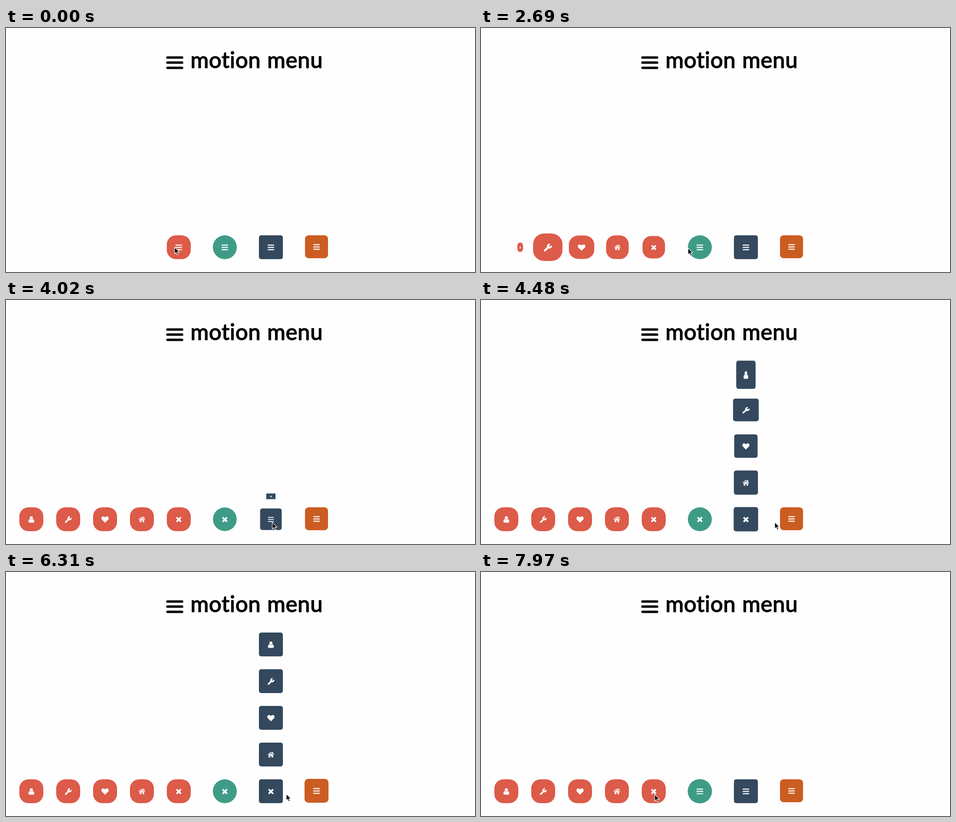
Animation, 1018 px wide and 532 px high, one loop 8 s. Source, as an HTML page:

```html
<!DOCTYPE html>
<html lang="en">
<head>
<meta charset="utf-8">
<title>motion menu</title>
<style>
  html, body { margin: 0; width: 100%; height: 100%; overflow: hidden; background: #fefefe; }
  svg { display: block; width: 1018px; height: 532px; }
  .title { font: 400 48px Lato, "Open Sans", sans-serif; letter-spacing: .6px; stroke: #000; stroke-width: 1.5px; stroke-linejoin: round; }
</style>
</head>
<body>
<svg id="stage" viewBox="0 0 1018 532" xmlns="http://www.w3.org/2000/svg">
  <defs>
    <path id="bars" d="M-6.2-5H6.2M-6.2 0H6.2M-6.2 5H6.2" stroke="#fff" stroke-width="2.1" stroke-linecap="round"/>
    <path id="close" d="M-3.5-3.2L3.5 3.8M3.5-3.2L-3.5 3.8" stroke="#fff" stroke-width="3.7" stroke-linecap="square"/>
    <g id="home" fill="#fff">
      <path d="M-5 1.2L0-3L5 1.2V5.3Q5 6 4.3 6H1.3V2.2H-1.3V6H-4.3Q-5 6-5 5.3Z"/>
      <path d="M3-6H5V-1L3-3Z"/>
      <path d="M-6.8 .3L0-5.3L6.8 .3" fill="none" stroke="#fff" stroke-width="1.5"/>
    </g>
    <path id="heart" fill="#fff" d="M0 7.2L-6.2 1.2C-8-.6-8.4-3-7.2-4.9C-5.6-7.3-2.2-7.2 0-4.2C2.2-7.2 5.6-7.3 7.2-4.9C8.4-3 8-.6 6.2 1.2Z"/>
    <g id="wrench">
      <path d="M-5.3 5.8L2-1.5" stroke="#fff" stroke-width="3.6" stroke-linecap="round"/>
      <path d="M6.6-3.9A3.2 3.2 0 1 1 4.3-6.2" transform="translate(-.5 .6)" fill="none" stroke="#fff" stroke-width="2.7"/>
    </g>
    <g id="user" fill="#fff">
      <ellipse cy="-3.3" rx="3.4" ry="3.7"/>
      <path d="M-3.4-.6Q0 2.4 3.4-.6Q6.3 .2 6.3 4.4Q6.3 7 3.8 7H-3.8Q-6.3 7-6.3 4.4Q-6.3 .2-3.4-.6Z"/>
    </g>
  </defs>
  <path d="M350.5 64.4H382.2M350.5 75.4H382.2M350.5 86.8H382.2" stroke="#000" stroke-width="5.3" stroke-linecap="round"/>
  <text class="title" x="400.5" y="87">motion</text>
  <text class="title" x="567" y="87">menu</text>
</svg>
<script>
const LOOP = 8000, GAP = 80, STAGGER = 100;
const stage = document.getElementById('stage');
const ICONS = ['home', 'heart', 'wrench', 'user'];

// quarter: ms until each scale first reaches 1, along and across the direction
const jelly = { quarter: [82, 45], slide: 38, swing: -1 };
const sling = { quarter: [80, 80], slide: 66, swing: 1 };

const MENUS = [
  { x: 375, y: 478, dir: [-1, 0], size: 52, radius: 20, color: '#dc5b49', open: 2370, shut: Infinity, ...jelly },
  { x: 475, y: 478, dir: [0, 1], size: 52, radius: 26, color: '#3e9c86', open: 3190, shut: 7480, ...jelly },
  { x: 575, y: 478, dir: [0, -1], size: 52, radius: 5, color: '#34495e', open: 4000, shut: 6500, ...jelly },
  { x: 674, y: 477, dir: [1, 0], size: 50, radius: 8, color: '#cb5d22', open: 4810, shut: 6030, keepsBars: true, ...sling },
];

const POINTER_START = [366, 478];
const POINTER_MOVES = [
  { from: 1230, to: 1410, at: [474, 487] },
  { from: 1710, to: 2060, at: [369, 477] },
  { from: 2390, to: 2850, at: [480, 481] },
  { from: 3330, to: 3850, at: [578, 485] },
  { from: 4080, to: 4780, at: [676, 484] },
  { from: 6080, to: 6450, at: [577, 484] },
  { from: 6600, to: 7150, at: [476, 484] },
  { from: 7500, to: 7760, at: [377, 485] },
];

const clamp = v => Math.min(1, Math.max(0, v));
const smooth = v => v * v * (3 - 2 * v);
const spring = (age, quarter) => 1 - Math.exp(-age / 110) * Math.cos(age / quarter * Math.PI / 2);
const wobble = age => age < 0 ? 0 : .22 * Math.exp(-age / 250) * Math.sin(age / 128 * Math.PI);

function add(parent, tag, attrs) {
  const el = document.createElementNS('http://www.w3.org/2000/svg', tag);
  for (const key in attrs) el.setAttribute(key, attrs[key]);
  return parent.appendChild(el);
}

function place(el, x, y, sx = 1, sy = sx) {
  el.setAttribute('transform', `translate(${x} ${y}) scale(${sx} ${sy})`);
}

function addTile({ size, radius, color }) {
  const tile = add(stage, 'g');
  add(tile, 'rect', { x: -size / 2, y: -size / 2, width: size, height: size, rx: radius, fill: color });
  return tile;
}

const addIcon = (tile, name) => add(tile, 'use', { href: '#' + name, y: .4 });

function makeItem(menu, icon, i) {
  const { x, y, dir: [dx, dy], open, shut, quarter, slide } = menu;
  const tile = addTile(menu);
  addIcon(tile, icon);
  return t => {
    const age = t - open - i * STAGGER;
    const gone = clamp((t - shut - i * 20) / 200);
    const visible = age > 0 && gone < 1;
    tile.setAttribute('visibility', visible ? 'visible' : 'hidden');
    if (!visible) return;
    const reach = GAP * (i + 1) - slide * Math.exp(-age / 90) - 20 * gone;
    const scales = quarter.map(q => spring(age, q) * (1 - gone * gone));
    if (dy) scales.reverse();
    place(tile, x + dx * reach, y + dy * reach, ...scales);
  };
}

function makeButton(menu) {
  const { x, y, open, shut, swing, keepsBars } = menu;
  const tile = addTile(menu);
  const bars = addIcon(tile, 'bars');
  const cross = addIcon(tile, 'close');
  return t => {
    const crossed = !keepsBars && t > open + 80 && t < shut + 80;
    bars.setAttribute('visibility', crossed ? 'hidden' : 'visible');
    cross.setAttribute('visibility', crossed ? 'visible' : 'hidden');
    place(tile, x, y, 1 + swing * (wobble(t - open) + wobble(t - shut)));
  };
}

function makePointer() {
  const arrow = add(stage, 'path', {
    d: 'M0 0V14.4L3.3 11.3L5.5 16.5L8 15.4L5.8 10.4H10.3Z',
    fill: '#000', stroke: '#fff', 'stroke-width': 1.1,
  });
  return t => {
    let [x, y] = POINTER_START;
    for (const { from, to, at } of POINTER_MOVES) {
      const k = smooth(clamp((t - from) / (to - from)));
      x += (at[0] - x) * k;
      y += (at[1] - y) * k;
    }
    place(arrow, x, y);
  };
}

const parts = MENUS.flatMap(menu => [...ICONS.map((icon, i) => makeItem(menu, icon, i)), makeButton(menu)]);
parts.push(makePointer());

const start = performance.now();
function draw(now) {
  const t = Math.max(0, now - start) % LOOP;
  parts.forEach(part => part(t));
  requestAnimationFrame(draw);
}
draw(start);
</script>
</body>
</html>
```
